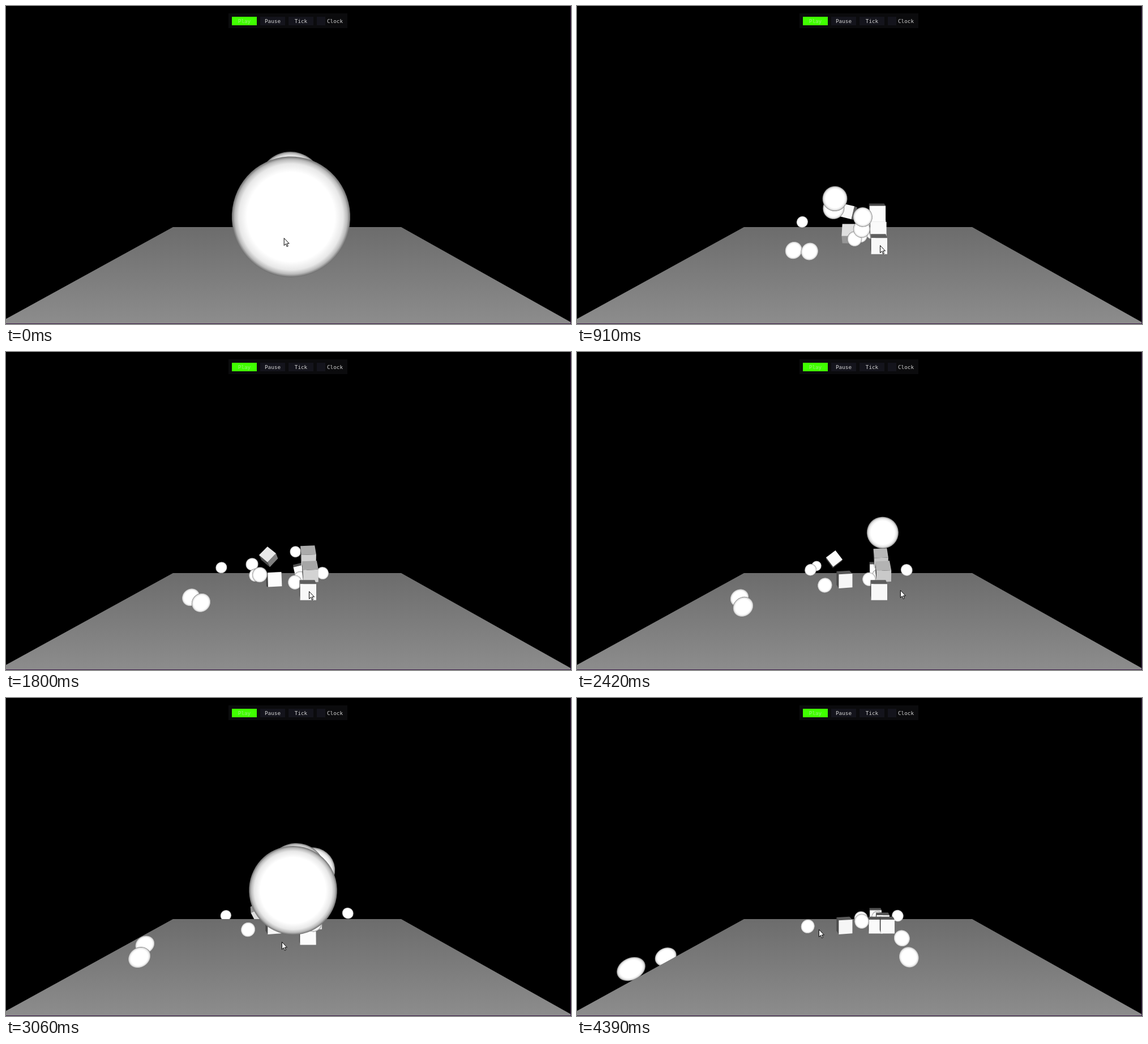
An HTML page with a canvas that plays this animation: 998 by 561 pixels, repeating every 4440 ms.

```html
<!DOCTYPE html>
<html lang="en">
<head>
<meta charset="utf-8">
<title>Physics sandbox</title>
<style>
html, body { margin: 0; width: 100%; height: 100%; overflow: hidden; background: #000; }
canvas { display: block; }
.bar { position: absolute; left: 393px; top: 13px; width: 210px; height: 26px; background: #0b0b0d; }
.bar span { position: absolute; top: 6px; width: 44px; height: 15px; background: #14141c; color: #d4d4d4;
  font: 9.3px/16px "DejaVu Sans Mono", monospace; text-align: center; }
.bar .on { background: #40ff00; color: #9bea80; }
.bar .box { width: 15px; }
.bar .label { background: none; width: 28px; text-align: left; }
</style>
</head>
<body>
<canvas id="stage" width="998" height="561"></canvas>
<div class="bar">
  <span class="on" style="left:6px">Play</span>
  <span style="left:56px">Pause</span>
  <span style="left:106px">Tick</span>
  <span class="box" style="left:156px"></span>
  <span class="label" style="left:174px">Clock</span>
</div>
<script>
const ctx = document.getElementById('stage').getContext('2d');
const LOOP = 4440, CX = 499, CY = 280, FOCAL = 486;
// World space: x right, y down, z away; SIZE is a ball's radius and half a box
const SIZE = 0.98, REST = 9.9, DEPTH = 48.2, HALF = 20, FALL = 8.6e-6, SPEED = 0.0257;

const mix = (a, b, u) => a + (b - a) * u;
const offFloor = ([x, , z]) => z > DEPTH || Math.abs(x) > HALF;

// Free motion: fall to the floor, roll on, drop past its edge
function coast([x0, y0, z0], [vx, vy, vz], t) {
  const x = x0 + vx * t, z = z0 + vz * t;
  const arc = s => y0 + vy * s + FALL * s * s;
  if (!offFloor([x, 0, z])) return [x, Math.min(REST, arc(t)), z];
  const past = Math.max(z > DEPTH ? (z - DEPTH) / vz : 0, (Math.abs(x) - HALF) / Math.abs(vx));
  return [x, arc(t - past) < REST ? arc(t) : REST + FALL * past * past, z];
}

const roll = (x, z, vx, vz) => t => coast([x, REST, z], [vx, 0, vz], t);

// A ball thrown from the camera towards aim, deflected after `air` ms
function toss(at, aim, air, ...velocity) {
  const slope = (aim - CX) / FOCAL;
  const flight = age => [
    slope * (2 + SPEED * age),
    Math.min(REST, Math.max(0.43 + FALL * (age - 210) ** 2, 0.96 - 0.00186 * age)),
    3.19 + SPEED * age
  ];
  return t => {
    const age = t - at;
    if (age < 0) return null;
    return age < air ? flight(age) : coast(flight(air), velocity, age - air);
  };
}

const balls = [
  roll(-8, 47, -0.0021, 0.0007),
  roll(-4, 32.2, -0.00398, -0.00039),
  roll(-1.9, 33.3, -0.00417, -0.00204),
  roll(-1.5, 36.5, 0.0018, 0.0022),
  roll(3.9, 31.1, -0.005, 0.0062),
  roll(-1.8, 36.8, 0.004, 0.0038),
  toss(-200, 503, 1135, 0.0011, -0.0082, 0.018),
  toss(-52, 505, 1300, 0.0008, 0, 0.0027),
  toss(60, 451, 1150, -0.0044, -0.0045, 0.0175),
  toss(190, 453, 1250, -0.0014, -0.007, 0.0013),
  toss(1883, 543, 1130, 0.0015, 0, -0.0037),
  toss(2720, 546, 1100, 0.0039, 0.003, 0.0035),
  toss(2830, 515, 1150, -0.002, -0.0015, 0.017),
  toss(2947, 509, 1150, -0.0012, -0.0005, 0.0137)
];

// A box knocked over between two times: tip swings out and back, turn stays.
// Angles are pitch, yaw, roll.
function knock(start, end, from, to, tip, turn = [0, 0, 0]) {
  return t => {
    const u = Math.min(1, Math.max(0, (t - start) / (end - start)));
    const pos = [mix(from[0], to[0], u), mix(from[1], to[1], u ** 3), mix(from[2], to[2], u)];
    if (t > end && offFloor(pos)) pos[1] += FALL * (t - end) ** 2;
    return [...pos, ...tip.map((a, i) => a * Math.sin(Math.PI * u) + turn[i] * u)];
  };
}

const storey = n => [2.4 - 0.1 * n, REST - 2 * SIZE * n, 34.5];
const boxes = [
  knock(3000, 4390, storey(0), [2.3, REST, 40], [-0.7, 0, 0]),
  knock(900, 3700, storey(1), [4, REST, 40], [0.5, 0, -0.05]),
  knock(1100, 3300, storey(2), [3.6, REST, 43], [0.6, 0, -0.04]),
  knock(500, 1900, [-1.2, REST, 39.5], [-2.2, REST, 39.8], [-1, 0.1, 0], [0, -0.25, 0]),
  knock(500, 3100, [-1, 7.2, 41], [-5.5, REST, 49], [-0.4, 0.7, 0], [0, -0.45, 1.2]),
  knock(900, 2420, [0.9, REST, 44], [2.7, REST, 46.9], [0, 0, -0.25])
];

const pointer = [[0, 491, 409], [130, 451, 414], [850, 535, 422], [1900, 535, 422],
  [2420, 571, 420], [3060, 487, 430], [3750, 426, 421], [LOOP, 427, 407]];

function polygon(points, fill, line) {
  ctx.beginPath();
  points.forEach(p => ctx.lineTo(...p));
  ctx.closePath();
  ctx.fillStyle = fill;
  ctx.fill();
  if (line) { ctx.strokeStyle = line; ctx.stroke(); }
}

const shade = ctx.createRadialGradient(0, 0, 0, 0, 0, 1);
[[0, '#fff'], [0.74, '#fff'], [0.88, '#e8e8e8'], [0.95, '#bababa'], [1, '#6c6c6c']]
  .forEach(stop => shade.addColorStop(...stop));

function drawBall([x, y, z]) {
  const k = FOCAL / z, r = SIZE * k, dx = x * k, dy = y * k;
  ctx.save();
  ctx.translate(CX + dx, CY + dy);
  ctx.rotate(Math.atan2(dy, dx));
  ctx.scale(r * Math.hypot(1, dx / FOCAL, dy / FOCAL), r); // wide-angle stretch
  ctx.beginPath();
  ctx.arc(0, 0, 1, 0, 7);
  ctx.fillStyle = shade;
  ctx.fill();
  ctx.restore();
}

const spin = (a, b, angle) => [
  a * Math.cos(angle) - b * Math.sin(angle), a * Math.sin(angle) + b * Math.cos(angle)];

function drawBox([x, y, z, pitch, yaw, tilt]) {
  const rotate = ([a, b, c]) => {
    [b, c] = spin(b, c, pitch);
    [c, a] = spin(c, a, yaw);
    [a, b] = spin(a, b, tilt);
    return [a * SIZE, b * SIZE, c * SIZE];
  };
  for (let axis = 0; axis < 3; axis++) for (const side of [-1, 1]) {
    const place = (u, v) => {
      const p = [];
      p[axis] = side; p[(axis + 1) % 3] = u; p[(axis + 2) % 3] = v;
      return rotate(p);
    };
    const n = place(0, 0), c = [x + n[0], y + n[1], z + n[2]];
    const facing = -(n[0] * c[0] + n[1] * c[1] + n[2] * c[2]) / Math.hypot(...c) / SIZE;
    if (facing <= 0) continue;
    const g = Math.min(252, 255 * (0.16 + 0.85 * facing)) | 0;
    const corners = [[-1, -1], [1, -1], [1, 1], [-1, 1]].map(([u, v]) => {
      const p = place(u, v), k = FOCAL / (z + p[2]);
      return [CX + (x + p[0]) * k, CY + (y + p[1]) * k];
    });
    polygon(corners, `rgb(${g},${g},${g})`);
  }
}

const floorFill = ctx.createLinearGradient(0, 390, 0, 558);
floorFill.addColorStop(0, '#6c6c6c');
floorFill.addColorStop(1, '#8c8c8c');

function drawFloor() {
  polygon([[295, 390], [698, 390], [998, 558], [998, 560], [0, 560], [0, 552]], floorFill);
  ctx.fillStyle = '#3c1c48';
  ctx.fillRect(0, 560, 998, 1);
  ctx.fillRect(997, 0, 1, 561);
}

function drawPointer(t) {
  const i = pointer.findIndex(k => k[0] > t), a = pointer[i - 1], b = pointer[i];
  const u = (t - a[0]) / (b[0] - a[0]);
  const x = mix(a[1], b[1], u), y = mix(a[2], b[2], u);
  const arrow = [[0, 0], [0, 13], [3, 10], [5, 15], [7, 14], [5, 9.5], [9, 9.5]];
  ctx.lineWidth = 1;
  polygon(arrow.map(([dx, dy]) => [x + dx + 0.5, y + dy + 0.5]), '#fff', '#000');
}

function frame(now) {
  const t = now % LOOP;
  ctx.fillStyle = '#000';
  ctx.fillRect(0, 0, 998, 561);
  const items = [
    ...balls.map(path => ({ draw: drawBall, pos: path(t) })),
    ...boxes.map(path => ({ draw: drawBox, pos: path(t) }))
  ].filter(o => o.pos).sort((a, b) => b.pos[2] - a.pos[2]);
  const show = o => o.draw(o.pos);
  items.filter(o => offFloor(o.pos)).forEach(show);
  drawFloor();
  items.filter(o => !offFloor(o.pos)).forEach(show);
  drawPointer(t);
  requestAnimationFrame(frame);
}
requestAnimationFrame(frame);
</script>
</body>
</html>
```
